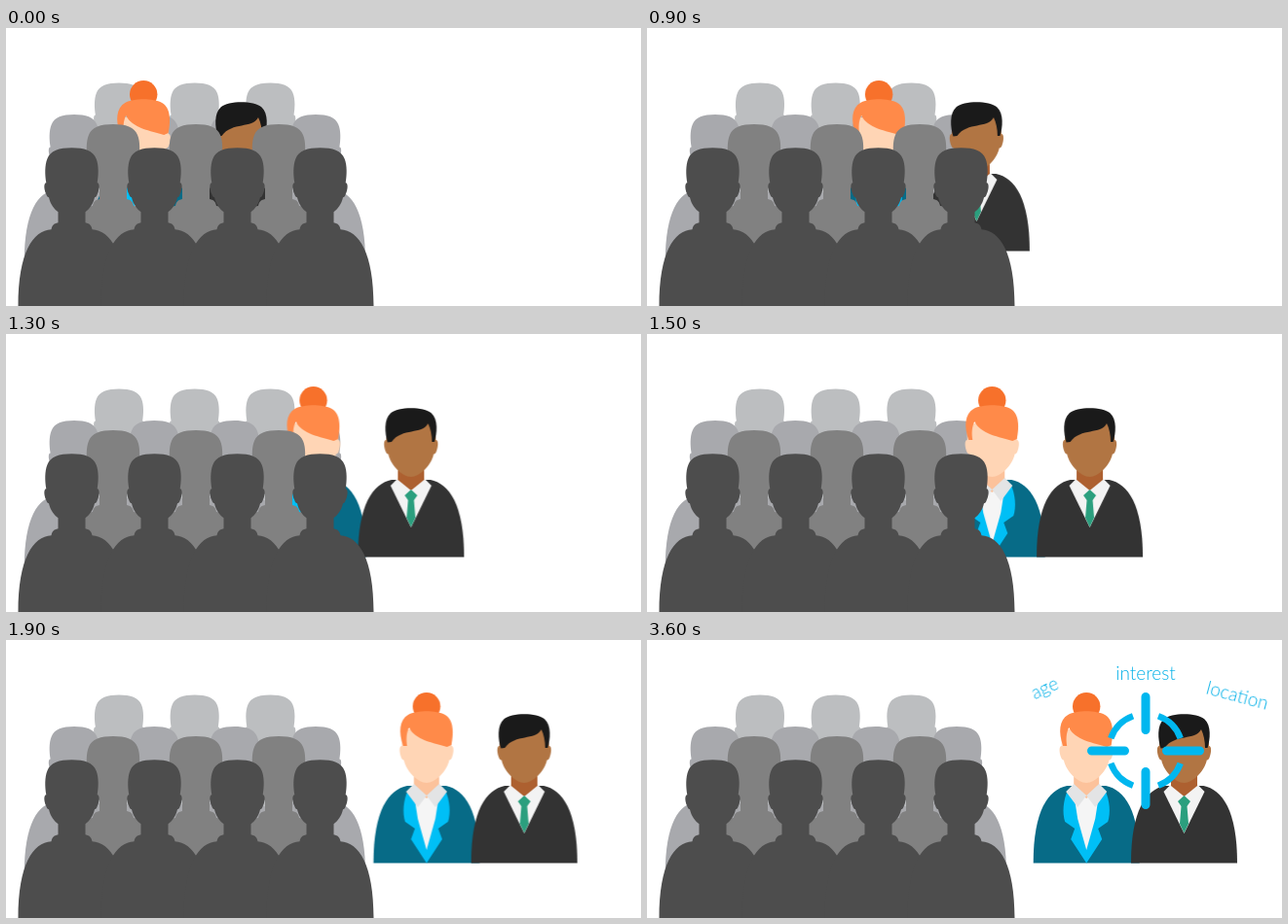
Animation of 652 by 286 pixels, one loop 4100 ms. Source, as an HTML page:

```html
<!DOCTYPE html>
<html lang="en">
<head>
<meta charset="utf-8">
<title>Finding the audience</title>
<style>
  html, body { margin: 0; width: 100%; height: 100%; overflow: hidden; background: #fff; }
  svg { display: block; width: 652px; height: 286px; }
  text { font: 300 19px Lato, "Open Sans", sans-serif; fill: #00b0e8; text-anchor: middle; }
</style>
</head>
<body>
<svg viewBox="0 0 652 286">
  <defs>
    <path id="figure" d="M0 0C13 0 22 3 25 11C28 18 27.5 28 26.2 36C29 36 28.5 43 26.5 47
      C25.5 50 24.5 51 23.5 51C22 58 18 63 14 66V77C19 78 20 80 21 84C40 85 55 108 55 163
      H-55C-55 108 -40 85 -21 84C-20 80 -19 78 -14 77V66C-18 63 -22 58 -23.5 51
      C-24.5 51 -25.5 50 -26.5 47C-28.5 43 -29 36 -26.2 36C-27.5 28 -28 18 -25 11C-22 3 -13 0 0 0Z"/>
    <path id="face" d="M-25.5 92V109C-28.5 109 -28 116 -26 121C-25.3 123 -24 123.500 -23.300 123.500
      C-21 135 -9 147 0 147C9 147 21 135 23.300 123.500C24 123.500 25.3 123 26 121
      C28 116 28.5 109 25.5 109V92Z"/>
    <path id="jacket" d="M-54.500 229.500C-54.500 175 -39 154 -20 150H20C39 154 54.500 175 54.500 229.500Z"/>
  </defs>

  <g id="back"></g>

  <g id="pair">
    <g id="woman" transform="translate(451.2 0)">
      <circle cy="68.300" r="14.200" fill="#f7712b"/>
      <use href="#jacket" fill="#076b87"/>
      <path d="M-20 153L0 229.500L20 153Z" fill="#076b87"/>
      <path d="M-19 154C-24 165 -25 178 -22 187L-12 194L-16 205L0 229.500L16 205L12 194L22 187
        C25 178 24 165 19 154Z" fill="#00bff6"/>
      <path d="M-14 152L-9 184L0 216L9 184L14 152Z" fill="#f5f5f5"/>
      <path d="M-13 136H13V152L0 163L-13 152Z" fill="#fcc29b"/>
      <path d="M-13 148L-21 156L-9 172L0 160L9 172L21 156L13 148L0 160Z" fill="#e3e4e5"/>
      <use href="#face" fill="#ffd5b5"/>
      <path d="M-24 109C-29 95 -28 82 -19 77C-10 72 10 72 19 77C28 82 28 96 25.500 108
        L21 110C8 106 -12 103 -18 90C-21 96 -21 103 -20 109Z" fill="#ff8a49"/>
    </g>
    <g id="man" transform="translate(551.5 0)">
      <use href="#jacket" fill="#333"/>
      <path d="M-14 149L-21 156L0 199L21 156L14 149Z" fill="#f3f3f3"/>
      <path d="M-13.500 136H13.500V150L0 161L-13.500 150Z" fill="#ad6030"/>
      <path d="M0 160L6.500 166L3 171L4.500 189L0 198.500L-4.500 189L-3 171L-6.500 166Z" fill="#2b9f7e"/>
      <use href="#face" fill="#b17543"/>
      <path d="M-24 111.500C-27 102 -28 88 -21 81.500C-13 74.500 13 74.500 21 81.500C28 88 27 102 24 111
        L21.500 111C21.500 104 20 97 17.500 92C11 104 -9 96 -20 111Z" fill="#1a1a1a"/>
    </g>
  </g>

  <g id="front"></g>

  <g id="sight" fill="none" stroke="#00b7ef">
    <circle cx="512" cy="114" r="38" stroke-width="6.500" pathLength="360"
      stroke-dasharray="50 40" stroke-dashoffset="-20"/>
    <path d="M512 58.500V92.500M512 135.500V169.500M456.500 114H490.500M533.500 114H567.500"
      stroke-width="9" stroke-linecap="round"/>
  </g>
  <text id="location" transform="translate(604.5 63.5) rotate(15)">location</text>
  <text id="interest" transform="translate(512 41)">interest</text>
  <text id="age" transform="translate(411 55.5) rotate(-25)">age</text>
</svg>
<script>
  const LOOP = 4100;
  const byId = id => document.getElementById(id);

  function addRow(layer, color, top, scale, centers) {
    byId(layer).insertAdjacentHTML('beforeend', centers.map(x =>
      `<use href="#figure" fill="${color}" transform="translate(${x} ${top}) scale(${scale})"/>`
    ).join(''));
  }

  addRow('back', '#bcbec0', 56.5, 0.92, [116, 193.7, 271.4]);
  addRow('back', '#a8a9ad', 89, 0.93, [70, 152.3, 234.5, 318]);
  addRow('front', '#818181', 99, 1, [110, 195, 280]);
  addRow('front', '#4d4d4d', 123.3, 1, [67.5, 152.5, 237.5, 322.5]);

  const play = (id, frames) =>
    byId(id).animate(frames, { duration: LOOP, iterations: Infinity });

  // The pair leaves the crowd in sixteen equal hops, one every 100 ms.
  const START = 'translateX(-310px)', END = 'translateX(0px)';
  play('pair', [
    { transform: START, offset: 0 },
    { transform: START, offset: 400 / LOOP, easing: 'steps(16, end)' },
    { transform: END, offset: 2000 / LOOP },
    { transform: END, offset: 1 }
  ]);

  const appearances = { sight: 2100, location: 2600, interest: 3100, age: 3600 };
  for (const [id, time] of Object.entries(appearances)) {
    play(id, [
      { opacity: 0, offset: 0, easing: 'steps(1, end)' },
      { opacity: 1, offset: time / LOOP },
      { opacity: 1, offset: 1 }
    ]);
  }
</script>
</body>
</html>
```
